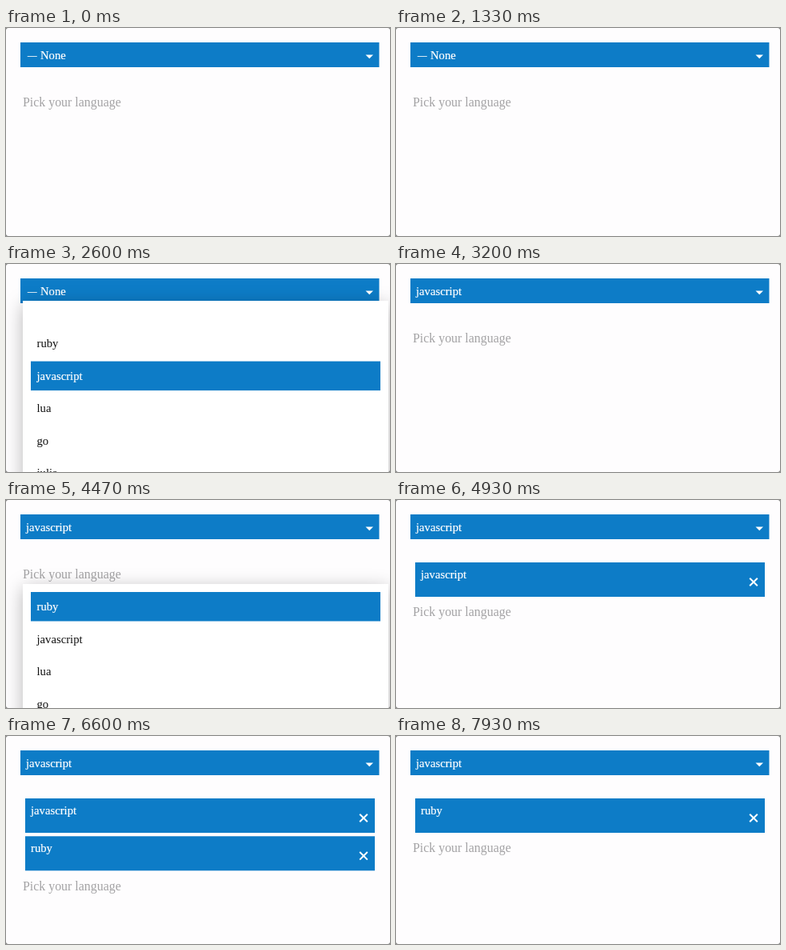
Write an HTML page that moves like this. It is 480 by 260 pixels and loops after 8000 ms.

```html
<!DOCTYPE html>
<html lang="en">
<head>
<meta charset="utf-8">
<title>Language picker</title>
<style>
  html, body { margin: 0; width: 100%; height: 100%; overflow: hidden; background: #777; }
  svg { display: block; width: 480px; height: 260px; }
  text { font: 14.7px "Liberation Serif", "Times New Roman", serif; fill: #111; white-space: pre; }
  .blue { fill: #0d7cc7; }
  .light { fill: #fff; stroke: #fff; stroke-width: .2px; }
  .hint { font-size: 15.9px; fill: #a3a2a4; }
  .panel { fill: #fff; filter: drop-shadow(0 5px 11px rgba(0, 0, 0, .28)); }
  .cross { stroke: #fff; stroke-width: 2; fill: none; }
</style>
</head>
<body>
<svg id="stage" viewBox="0 0 480 260">
  <clipPath id="window"><rect width="480" height="260" rx="3"/></clipPath>
  <g id="root" clip-path="url(#window)">
    <rect width="480" height="260" fill="#fefdfe"/>
    <rect class="blue" x="18" y="18" width="448.5" height="31"/>
    <path d="M449.5 33.5h9.5l-4.75 4.8z" fill="#fff"/>
  </g>
</svg>
<script>
const LOOP = 8000, TICK = 1000 / 15;
const TAG_TOP = 78, TAG_STEP = 47.3, ROW_STEP = 40.6, ROW_HEIGHT = 36.5;
const root = document.getElementById('root');

function add(parent, name, attrs, text) {
  const el = document.createElementNS('http://www.w3.org/2000/svg', name);
  for (const key in attrs) el.setAttribute(key, attrs[key]);
  if (text) el.textContent = text;
  parent.append(el);
  return el;
}

const show = (el, on) => { el.style.display = on ? '' : 'none'; };
const moveY = (el, y) => el.setAttribute('transform', `translate(0 ${y})`);
const ramp = (t, from, to) => Math.max(0, Math.min(1, (t - from) / (to - from)));

const none = add(root, 'g', {});
add(none, 'text', { x: 27, y: 38, class: 'light', style: 'font-size:11.5px' }, '—');
add(none, 'text', { x: 43, y: 38.5, class: 'light' }, 'None');
const value = add(root, 'text', { x: 25, y: 38.5, class: 'light' }, 'javascript');

function makeTag(label) {
  const g = add(root, 'g', {});
  add(g, 'rect', { class: 'blue', x: 24, y: 0, width: 437, height: 43 });
  add(g, 'text', { class: 'light', x: 31, y: 20 }, label);
  add(g, 'path', { class: 'cross', d: 'M442.2 19.7l9.6 9.6m0 -9.6l-9.6 9.6' });
  return g;
}

const tags = [
  { el: makeTag('javascript'), from: 4660, to: 7860 },
  { el: makeTag('ruby'), from: 6130, to: LOOP }
];
const hint = add(root, 'text', { class: 'hint', x: 21, y: 98 }, 'Pick your language');

function makeMenu(labels) {
  const g = add(root, 'g', {});
  add(g, 'rect', { class: 'panel', x: 21, y: 0, width: 457, height: 300 });
  let y = 10;
  const rows = labels.map(label => {
    const height = label ? ROW_HEIGHT : 21;
    const bar = add(g, 'rect', { class: 'blue', x: 31, y, width: 437, height });
    const text = add(g, 'text', { x: 38.5, y: y + 23 }, label);
    y += label ? ROW_STEP : 25;
    return { bar, text };
  });
  return { g, rows };
}

const langs = ['ruby', 'javascript', 'lua', 'go', 'julia'];
// open and close: [start, end]; picks: [time, highlighted row]
const menus = [
  { ...makeMenu(['', ...langs]), top: () => 46, open: [1733, 2133], close: [2800, 3200],
    picks: [[0, 0], [2260, 1], [2530, 2]] },
  { ...makeMenu(langs), top: n => 105 + n * TAG_STEP, open: [3733, 4067], close: [4600, 4930],
    picks: [[0, 0], [4530, 1]] },
  { ...makeMenu(langs.filter(l => l !== 'javascript')), top: n => 105 + n * TAG_STEP,
    open: [5533, 5867], close: [6067, 6400], picks: [[0, 0]] }
];

function draw(time) {
  const t = Math.floor((time % LOOP) / TICK + .06) * TICK;
  const picked = t >= 2860;
  show(none, !picked);
  show(value, picked);

  let count = 0;
  for (const { el, from, to } of tags) {
    const on = t >= from && t < to;
    show(el, on);
    if (on) moveY(el, TAG_TOP + TAG_STEP * count++);
  }
  moveY(hint, count * TAG_STEP);

  for (const { g, rows, top, open, close, picks } of menus) {
    const alpha = ramp(t, ...open) * (1 - ramp(t, ...close));
    show(g, alpha > 0);
    if (!alpha) continue;
    g.style.opacity = alpha;
    moveY(g, top(count));
    const active = picks.filter(([at]) => t >= at).pop()[1];
    rows.forEach(({ bar, text }, i) => {
      show(bar, i === active);
      text.setAttribute('class', i === active ? 'light' : '');
    });
  }
}

const start = performance.now();
function frame() {
  draw(performance.now() - start);
  requestAnimationFrame(frame);
}
frame();
</script>
</body>
</html>
```
